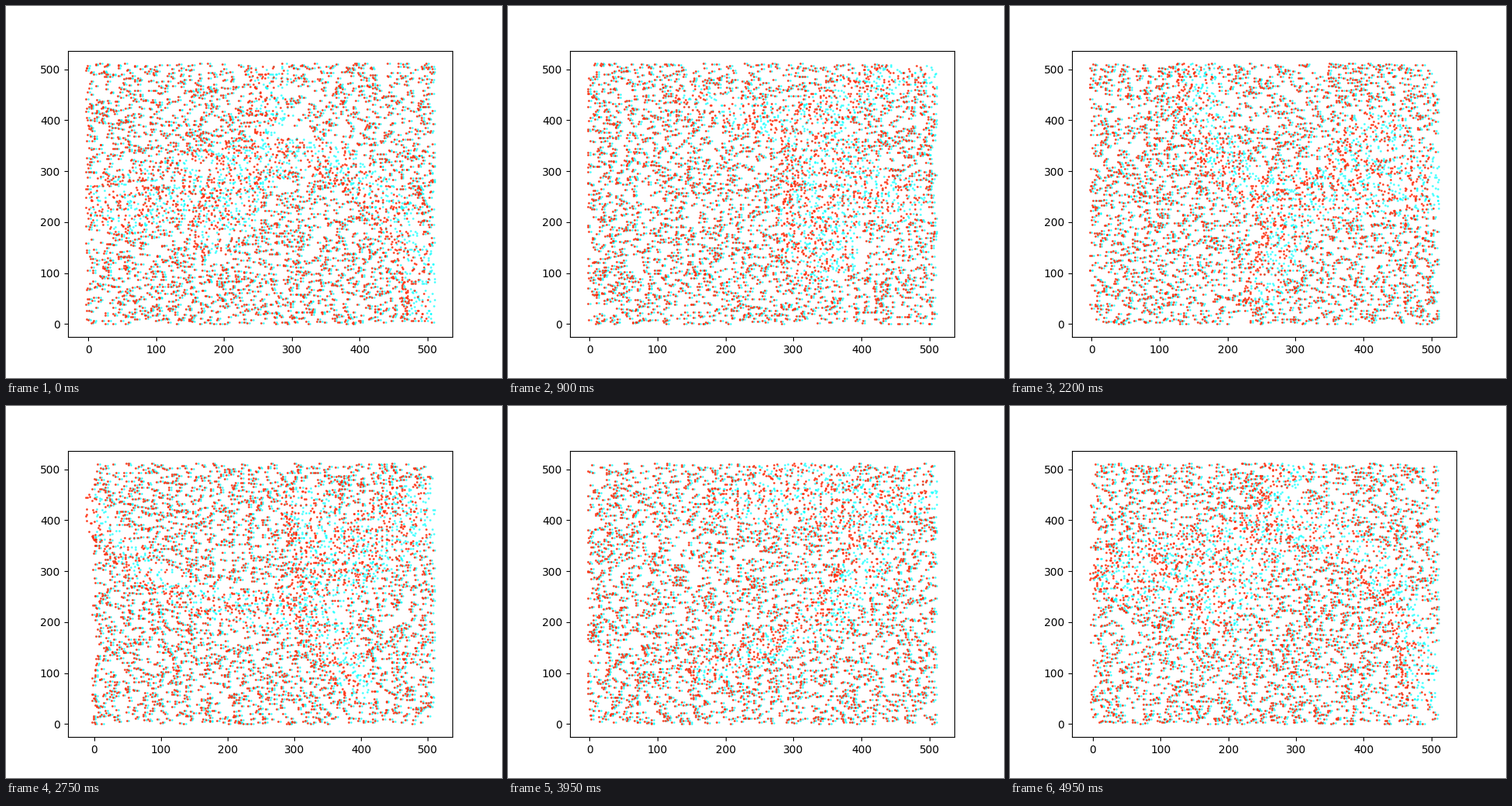
Recreate the animation shown at these times as a matplotlib script. Size 640 by 480 pixels, loop 5 s.

```python
import numpy as np
import matplotlib.pyplot as plt
from matplotlib.animation import FuncAnimation

FRAMES = 100
INTERVAL = 50
SIZE = 512
DOTS = 3900
FAR_SHIFT = 3
NEAR_SHIFT = 13
PIVOT = np.array([300, 304])
STEPS = np.linspace(0, 1, 20)


def stroke(start, end, r0, r1):
    """Soft discs along a straight line: columns x, y, radius."""
    return np.linspace((*start, r0), (*end, r1), len(STEPS))


def arc(corner, width, height, r0, r1):
    """Soft discs along a quarter ellipse from its top to its right end."""
    t = STEPS * np.pi / 2
    return np.column_stack([corner[0] + width * np.sin(t),
                            corner[1] + height * np.cos(t),
                            r0 + (r1 - r0) * STEPS])


# Hidden figure: body, belly, fin and long curved arm
FIGURE = np.vstack([
    stroke((58, 240), (260, 325), 65, 55),
    stroke((195, 170), (215, 290), 45, 50),
    stroke((270, 350), (270, 530), 40, 26),
    arc((270, 30), 225, 315, 42, 26),
])


def height_at(points):
    """0 outside the figure, rising to 1 along its core."""
    gap = points[:, None] - FIGURE[None, :, :2]
    distance = np.hypot(gap[..., 0], gap[..., 1])
    depth = np.max(1 - distance / FIGURE[:, 2], axis=1)
    return np.clip(1.6 * depth, 0, 1)


def shift_at(points, n):
    """Horizontal offset between the two eyes' views."""
    angle = 2 * np.pi * n / FRAMES + 0.1 * np.sin(np.pi * n / FRAMES)
    c, s = np.cos(angle), np.sin(angle)
    sway = 2 * np.pi * (n - 20)
    centre = np.array([325 + 50 * np.cos(sway / 60),
                       325 + 65 * np.cos(sway / 66)])
    # Turn the points back into the figure's own frame
    local = (points - centre) @ np.array([[c, -s], [s, c]]) + PIVOT
    return FAR_SHIFT + np.round(NEAR_SHIFT * height_at(local))


fig, ax = plt.subplots(figsize=(6.4, 4.8), dpi=100)


def draw(n):
    rng = np.random.default_rng(1000 + n)
    points = rng.integers(0, SIZE, (DOTS, 2))
    x, y = points.T
    ax.clear()
    ax.scatter(x, y, s=4, color="cyan", alpha=0.7, linewidths=0)
    ax.scatter(x - shift_at(points, n), y, s=4, color="#ff3010",
               alpha=0.9, linewidths=0)
    return ax.collections


anim = FuncAnimation(fig, draw, frames=FRAMES, interval=INTERVAL,
                     init_func=lambda: [], repeat=True, repeat_delay=0)
plt.show()
```
